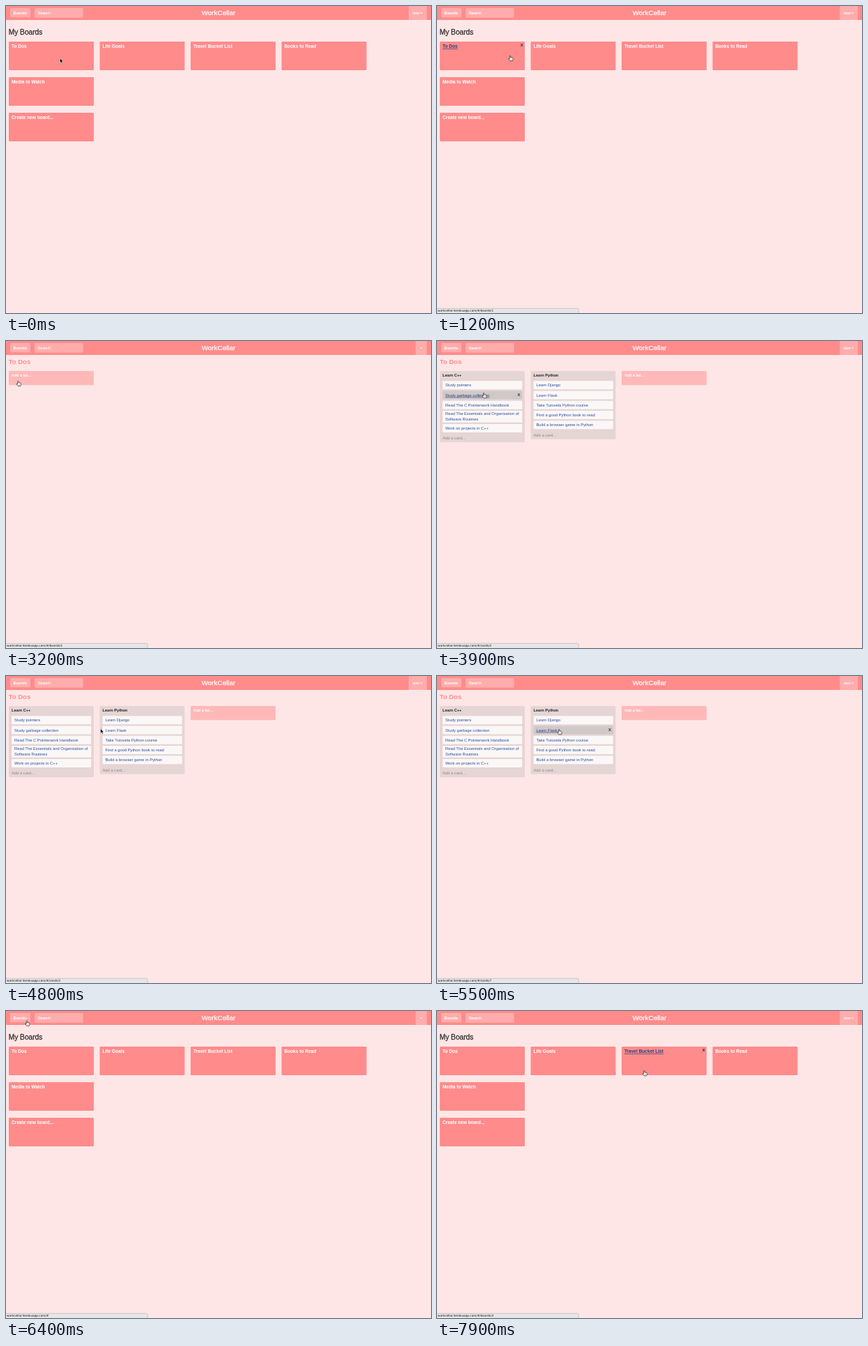
Write an HTML page that moves like this. It is 610 px wide and 440 px high and loops after 8000 ms.

```html
<!DOCTYPE html>
<html lang="en">
<head>
<meta charset="utf-8">
<title>Boards</title>
<style>
  html, body { margin: 0; width: 100%; height: 100%; overflow: hidden; background: #ffe6e6; }
  svg { display: block; width: 610px; height: 440px; }
  text { font-family: "Liberation Sans", Arial, sans-serif; white-space: pre; }
  .status { font-family: "DejaVu Sans", Verdana, sans-serif; }
</style>
</head>
<body>
<svg id="stage" viewBox="0 0 610 440" xmlns="http://www.w3.org/2000/svg"></svg>
<script>
const LOOP = 8000, STEP = 100;
const PINK = '#ff8b8b', PALE = '#ffacac', NAVY = '#25427c', LINK = '#24509c';
const LEFT = 4, COL = 130.5, ROW = 51, WIDTH = 122, LIST_TOP = 43;
const HOST = 'workcellar.herokuapp.com/#';

const boards = ['To Dos', 'Life Goals', 'Travel Bucket List', 'Books to Read', 'Media to Watch'];
const lists = [
  { name: 'Learn C++', cards: [
    ['Study pointers'], ['Study garbage collection'], ['Read The C Pointerwork Handbook'],
    ['Read The Essentials and Organisation of', 'Software Routines'], ['Work on projects in C++']] },
  { name: 'Learn Python', cards: [
    ['Learn Django'], ['Learn Flask'], ['Take Tutovela Python course'],
    ['Find a good Python book to read'], ['Build a browser game in Python']] }
];

// Pointer moves; `via` is the point passed halfway. It rests in between.
const home = [77.5, 75];
const moves = [
  { from: 0, to: 900, end: [80, 75], via: [5, 51] },
  { from: 1100, to: 2000, end: [45, 64], via: [261, 40] },
  { from: 2000, to: 2200, end: [11.5, 53.5] },
  { from: 2400, to: 2700, end: [17.5, 56.8] },
  { from: 3200, to: 3600, end: [67, 75] },
  { from: 3800, to: 3900, end: [67.3, 74] },
  { from: 4500, to: 5000, end: [173, 76.5] },
  { from: 5400, to: 5500, end: [175.2, 76] },
  { from: 5500, to: 6000, end: [30, 13.5], via: [256, 30] },
  { from: 6500, to: 7400, end: [244.5, 85], via: [95, 62] },
  { from: 7400, to: 7600, end: [245, 85.5] },
  { from: 7700, to: 7900, end: [297.5, 85] }
];

const ease = k => k * k * (3 - 2 * k);

// Quadratic curve from a to b that passes through m halfway
function arc(a, b, m, k) {
  const c = 2 * m - (a + b) / 2;
  return (1 - k) ** 2 * a + 2 * k * (1 - k) * c + k * k * b;
}

function pointer(t) {
  let at = home;
  for (const { from, to, end, via } of moves) {
    if (t <= from) break;
    const k = ease(Math.min(1, (t - from) / (to - from)));
    at = end.map((b, i) => arc(at[i], b, via ? via[i] : (at[i] + b) / 2, k));
  }
  return { x: at[0], y: at[1] };
}

const between = (t, a, b) => t >= a && t < b;
const onLists = t => between(t, 3100, 6200);
const loading = t => between(t, 3100, 3300) || between(t, 6200, 6400);
const userShown = t => !between(t, 3100, 3300) && !between(t, 6200, 6600);

const tileBox = (col, row) => ({ x: LEFT + COL * col, y: ROW * (row + 1), w: WIDTH, h: 41 });
const boardBox = i => tileBox(i % 4, Math.floor(i / 4));
const createBox = t => tileBox(0, loading(t) ? 0 : 2);
const addListBox = t => ({ x: LEFT + (loading(t) ? 0 : 2 * COL), y: LIST_TOP, w: WIDTH, h: 20.3 });
const navBox = { x: 6, y: 3, w: 29, h: 13.3 };

// Stack the cards of each list
let id = 0;
lists.forEach((list, n) => {
  list.x = LEFT + COL * n;
  let y = LIST_TOP + 14.3;
  list.cards = list.cards.map(lines => {
    const h = lines.length > 1 ? 16.6 : 12;
    const card = { lines, id: ++id, box: { x: list.x + 4, y, w: 114.3, h } };
    y += h + 2.25;
    return card;
  });
  list.end = y;
});

function linksAt(t) {
  const links = [{ box: navBox, url: '' }];
  if (onLists(t)) {
    if (!loading(t)) lists.forEach(l => l.cards.forEach(c => links.push({ box: c.box, url: '/cards/' + c.id })));
    links.push({ box: addListBox(t) });
  } else {
    if (!loading(t)) boards.forEach((b, i) => links.push({ box: boardBox(i), url: '/boards/' + (i + 1) }));
    links.push({ box: createBox(t) });
  }
  return links;
}

// The window reacts to the pointer only once it has focus
const FOCUS = 1200;

function hovered(t) {
  if (t < FOCUS) return null;
  const { x, y } = pointer(t);
  return linksAt(t).find(({ box: b }) => between(x, b.x, b.x + b.w) && between(y, b.y, b.y + b.h)) || null;
}

function lastUrl(t) {
  for (let s = t; s >= FOCUS; s -= STEP) {
    const hit = hovered(s);
    if (hit && hit.url !== undefined) return hit.url;
  }
  return null;
}

const rect = (b, fill, r = 1) =>
  `<rect x="${b.x}" y="${b.y}" width="${b.w}" height="${b.h}" rx="${r}" fill="${fill}"/>`;
const text = (x, y, s, size, fill, extra = '') =>
  `<text x="${x}" y="${y}" font-size="${size}" fill="${fill}" ${extra}>${s}</text>`;
const BOLD = 'font-weight="700"', UNDER = 'text-decoration="underline"';
const thick = (color, w) => `stroke="${color}" stroke-width="${w}"`;

function header(t) {
  const user = userShown(t), x = user ? 578 : 588;
  return rect({ x: 0, y: 0, w: 610, h: 20 }, PINK, 0) +
    rect(navBox, PALE) +
    text(10.6, 12, 'Boards', 5.6, '#fff', BOLD) +
    rect({ x: 41, y: 3, w: 69.6, h: 13.7 }, PALE) +
    text(45.8, 12, 'Search', 5.7, '#fff', thick('#fff', .15)) +
    text(305, 13.4, 'WorkCellar', 9.9, '#fff', 'text-anchor="middle" ' + thick('#fff', .25)) +
    rect({ x, y: 0, w: 604 - x, h: 20 }, PALE, 0) +
    (user ? text(584, 11.8, 'test', 5.2, '#fff', BOLD) : '') +
    '<path d="M594.4 9.5h3.4l-1.7 1.7z" fill="#fff"/>';
}

function boardTile(box, name, hot) {
  return rect(box, PINK) +
    text(box.x + 3.9, box.y + 9, name, 6.55, hot ? NAVY : '#fff', BOLD + (hot ? ' ' + UNDER : '')) +
    (hot ? text(box.x + 115.8, box.y + 7.2, 'X', 5.8, '#2d2030', BOLD) : '');
}

function boardsPage(t, url) {
  return text(3.7, 41.3, 'My Boards', 10.2, '#333', thick('#333', .3)) +
    (loading(t) ? '' : boards.map((b, i) => boardTile(boardBox(i), b, url === '/boards/' + (i + 1))).join('')) +
    boardTile(createBox(t), 'Create new board...', false);
}

function cardTile({ lines, box, id }, url) {
  const hot = url === '/cards/' + id;
  const first = lines.length > 1 ? 6.3 : 8.1;
  return rect(box, hot ? '#d1c8c9' : '#fcf7f7', 1.2) +
    lines.map((s, i) => text(box.x + 4, box.y + first + 8.1 * i, s, 5.8, hot ? NAVY : LINK, hot ? UNDER : '')).join('') +
    (hot ? text(box.x + 107.6, box.y + 7.1, 'X', 5.8, '#222', thick('#222', .15)) : '');
}

function listPanel(l, url) {
  return rect({ x: l.x, y: LIST_TOP, w: WIDTH, h: l.end - LIST_TOP + 12.2 }, '#e6d5d5', 1.5) +
    text(l.x + 4, 51, l.name, 5.6, '#222', BOLD) +
    l.cards.map(c => cardTile(c, url)).join('') +
    text(l.x + 4, l.end + 8.2, 'Add a card...', 5.8, '#888');
}

function listsPage(t, url) {
  const add = addListBox(t);
  return (t < 3200 ? '' : text(3.7, 33.2, 'To Dos', 9.5, PINK, BOLD)) +
    (loading(t) ? '' : lists.map(l => listPanel(l, url)).join('')) +
    rect(add, '#ffb8b8', 1.5) +
    text(add.x + 4, 51, 'Add a list...', 5.7, '#fff', thick('#fff', .15));
}

function statusBar(url) {
  if (url === null) return '';
  return '<path d="M-1 441V433.4H201.5Q203.2 433.4 203.2 435V441Z" fill="#e6e6e6" stroke="#b5aeae" stroke-width=".6"/>' +
    text(1, 438.4, HOST + url, 4.22, '#111', 'class="status"');
}

function cursor(t, hand) {
  const { x, y } = pointer(t);
  const shape = hand
    ? '<path d="M-.8 1Q-.1 -.6 .6 1V3Q3.8 2.6 4 4.5Q4.2 6 3.2 7.9H-.4Q-1 6.6 -2.3 5.2Q-2.4 3.6 -.8 4.9Z" fill="#fff" stroke="#111" stroke-width=".65"/>' +
      '<path d="M.9 5v1.7M2 5v1.7" stroke="#333" stroke-width=".35"/>'
    : '<path d="M0 0V6.4L1.5 5.1L2.5 7.4L3.6 6.9L2.6 4.7H4.5Z" stroke="#fff" stroke-width=".45"/>';
  return `<g transform="translate(${x} ${y})">${shape}</g>`;
}

const stage = document.getElementById('stage');
let shown = -1;

function draw(t) {
  const hit = hovered(t), url = hit && hit.url;
  stage.innerHTML = rect({ x: 0, y: 0, w: 610, h: 440 }, '#ffe6e6', 0) + header(t) +
    (onLists(t) ? listsPage(t, url) : boardsPage(t, url)) +
    statusBar(lastUrl(t)) + cursor(t, !!hit);
}

const start = performance.now();
function tick() {
  const t = Math.floor(((performance.now() - start) % LOOP) / STEP) * STEP;
  if (t !== shown) draw(shown = t);
  requestAnimationFrame(tick);
}
tick();
</script>
</body>
</html>
```
